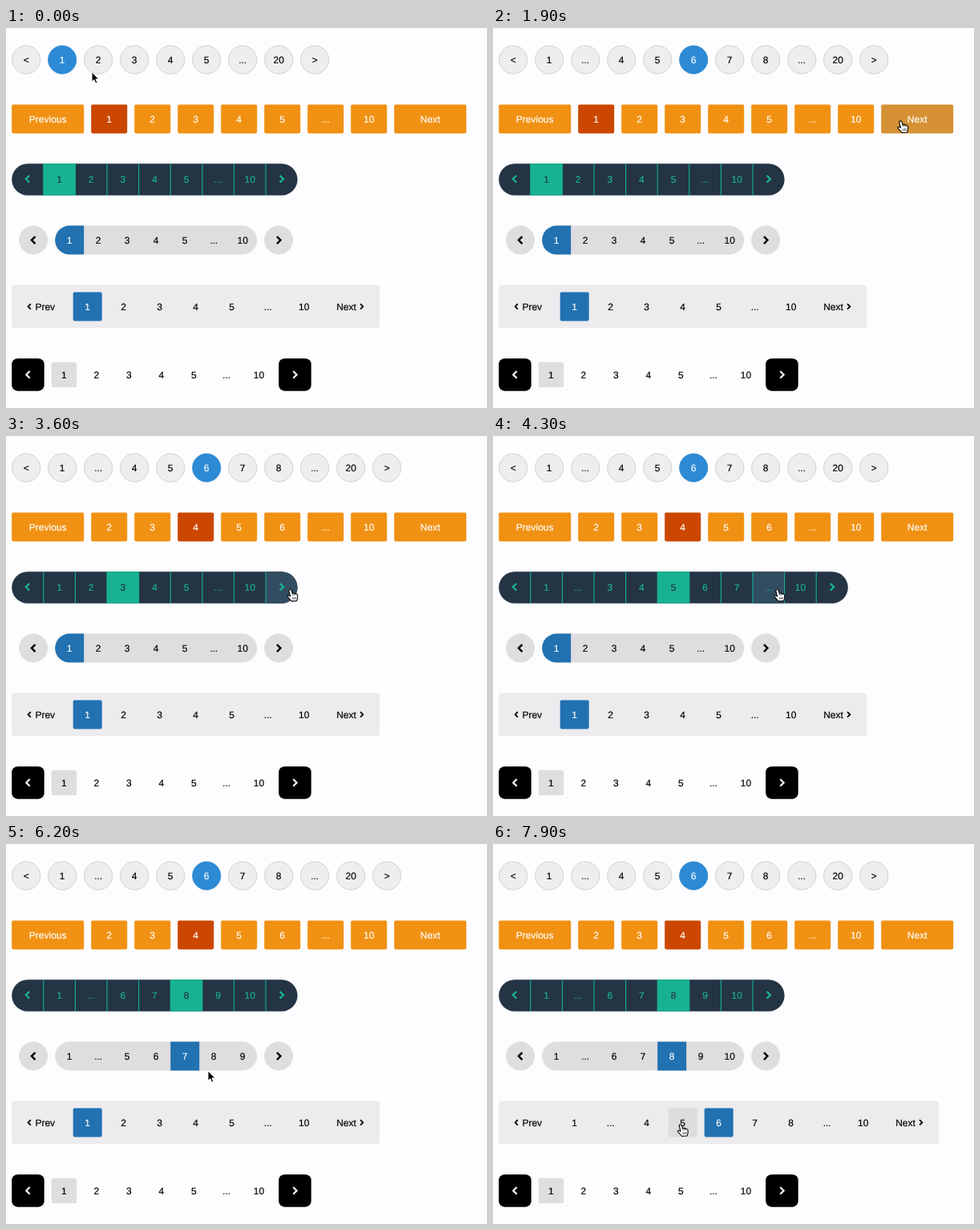
Write an HTML page that moves like this. It is 600 by 474 pixels and loops after 8000 ms.

```html
<!DOCTYPE html>
<html lang="en">
<head>
<meta charset="utf-8">
<title>Pagination styles</title>
<style>
  html, body { margin: 0; width: 100%; height: 100%; overflow: hidden; background: #fdfcfe; }
  svg { display: block; width: 600px; height: 474px; }
  text { font: 13.333px "Liberation Sans", Arial, sans-serif; text-rendering: geometricPrecision; stroke-width: .2; }
</style>
</head>
<body>
<svg id="stage" viewBox="0 0 600 474"></svg>
<script>
const stage = document.getElementById('stage');
const LOOP = 8000, STEP = 100, ZOOM = .9;
const INK = '#000', BLUE = '#2271b0', TEAL = '#1ab394', NAVY = '#243444';

// edge: width of the prev and next buttons, join: space beside them
const rows = {
  circles: { x: 8, y: 24, h: 40, edge: 40, join: 10, size: 40, gap: 10, total: 20, prev: '&lt;', next: '&gt;', round: true, paint: paintCircles },
  blocks: { x: 8, y: 106, h: 40, edge: 100, join: 10, size: 50, gap: 10, total: 10, prev: 'Previous', next: 'Next', paint: paintBlocks },
  dark: { x: 8, y: 188, h: 44, edge: 44, join: 0, size: 44, gap: 0, total: 10, paint: paintDark },
  pill: { x: 18, y: 274, h: 40, edge: 40, join: 10, size: 40, gap: 0, total: 10, paint: paintPill },
  panel: { x: 18, y: 366, h: 40, edge: 65, join: 10, size: 40, gap: 10, total: 10, prev: 'Prev', next: 'Next', paint: paintPanel },
  squares: { x: 8, y: 458, h: 45, edge: 45, join: 10, size: 35, gap: 10, total: 10, paint: paintSquares }
};

// Where the pointer goes: it arrives, clicks at a steady beat, then moves on
const visit = (at, row, slot, dx, clicks, dy = 3) => ({ at, row, slot, dx, clicks, dy });
const visits = [
  visit(0, 'circles', 2, -9, 0, 17),
  visit(100, 'circles', 2, -3, 1),
  visit(500, 'circles', 4, 0, 1),
  visit(1200, 'circles', 5, 11, 1),
  visit(1900, 'blocks', 8, -23, 3),
  visit(3100, 'dark', 8, 12, 5),
  visit(5200, 'pill', 6, 13, 2),
  visit(6200, 'pill', 6, -8, 0, 20.5),
  visit(6300, 'pill', 6, 0, 1),
  visit(7000, 'panel', 4, -3, 1),
  visit(7400, 'panel', 5, -3, 1),
  visit(7900, 'panel', 4, -3, 0)
];
const BEAT = 300, FIRST_CLICK = 200;

// A window of five pages, with edge buttons where pages are skipped
function pagesFor(current, total) {
  const start = Math.min(Math.max(current - 2, 1), total - 4);
  const list = Array.from({ length: 5 }, (_, i) => start + i);
  if (start > 2) list.unshift(1, '...');
  if (start + 4 < total - 1) list.push('...', total);
  return list;
}

function cellsFor(row, page) {
  const pages = pagesFor(page, row.total);
  const first = row.x + row.edge + row.join, pitch = row.size + row.gap;
  const cells = pages.map((text, i) => ({ text, to: text === '...' ? page + (i > 1 ? 3 : -3) : text, x: first + pitch * i, w: row.size, on: text === page }));
  const end = first + pitch * pages.length - row.gap + row.join;
  return [
    { text: row.prev, to: page - 1, x: row.x, w: row.edge, dir: -1 },
    ...cells,
    { text: row.next, to: page + 1, x: end, w: row.edge, dir: 1 }
  ].map(c => ({ ...c, cx: c.x + c.w / 2 }));
}

function hits(row, cell, [x, y]) {
  if (row.round) return Math.hypot(x - cell.cx, y - row.y - row.h / 2) < row.h / 2 - 1;
  return x >= cell.x && x < cell.x + cell.w && y >= row.y && y < row.y + row.h;
}

function aim({ row, slot, dx, dy }) {
  const r = rows[row];
  return [cellsFor(r, 1)[slot].cx + dx, r.y + r.h / 2 + dy];
}

function pointerAt(t) {
  const i = visits.findLastIndex(v => v.at <= t);
  const from = visits[i], to = visits[i + 1], start = aim(from);
  const leave = from.at + BEAT * from.clicks;
  if (!to || t <= leave) return start;
  const k = (t - leave) / (to.at - leave), ease = k * k * (3 - 2 * k);
  return aim(to).map((end, axis) => start[axis] + (end - start[axis]) * ease);
}

function pageAt(name, t) {
  const row = rows[name];
  let page = 1;
  for (const v of visits.filter(v => v.row === name)) {
    for (let n = 0; n < v.clicks && v.at + FIRST_CLICK + BEAT * n <= t; n++) {
      page = cellsFor(row, page).find(c => hits(row, c, aim(v))).to;
    }
  }
  return page;
}

const rect = (x, y, w, h, r, fill, extra = '') =>
  `<rect x="${x}" y="${y}" width="${w}" height="${h}" rx="${r}" fill="${fill}" ${extra}/>`;
const label = (x, y, s, color = INK, anchor = 'middle') =>
  `<text x="${x}" y="${y + 4.7}" fill="${color}" stroke="${color}" text-anchor="${anchor}">${s}</text>`;
const chevron = (x, y, dir, size, color, width) =>
  `<path d="M${x - dir * size / 2} ${y - size}l${dir * size} ${size}l${-dir * size} ${size}" fill="none" stroke="${color}" stroke-width="${width}"/>`;
// A bar end with its outer side rounded
const cap = (c, { y, h }, dir, fill) => {
  const r = h / 2, flat = dir < 0 ? c.x + c.w : c.x;
  return `<path d="M${flat} ${y}h${dir * (c.w - r)}a${r} ${r} 0 0 ${dir > 0 ? 1 : 0} 0 ${h}h${-dir * (c.w - r)}Z" fill="${fill}"/>`;
};

function paintCircles(row, cells, mid) {
  return cells.map(c => {
    const fill = c.on ? '#2d8ad4' : c.hover ? '#cfced0' : '#efedf0';
    return rect(c.x + .5, row.y + .5, 39, 39, 19.5, fill, `stroke="${c.on ? fill : '#cccbcd'}"`)
      + label(c.cx, mid, c.text, c.on ? '#fff' : INK);
  }).join('');
}

function paintBlocks(row, cells, mid) {
  return cells.map(c =>
    rect(c.x, row.y, c.w, row.h, 2, c.on ? '#cb4700' : c.hover ? '#d59134' : '#f19113')
    + label(c.cx, mid, c.text, '#fff')).join('');
}

function paintDark(row, cells, mid) {
  const end = cells[cells.length - 1].x + row.edge;
  const bar = rect(row.x, row.y, end - row.x, row.h, row.h / 2, NAVY);
  const faces = cells.map(c => {
    const fill = c.on ? '#18b292' : '#324d61';
    const back = !c.on && !c.hover ? '' : c.dir ? cap(c, row, c.dir, fill) : rect(c.x, row.y, c.w, row.h, 0, fill);
    return back + (c.dir ? chevron(c.cx, mid - .7, c.dir, 4.9, TEAL, 2.5) : label(c.cx, mid, c.text, c.on ? NAVY : TEAL));
  });
  const lines = cells.slice(1).map(c => rect(c.x - .6, row.y, 1.2, row.h, 0, TEAL));
  return bar + faces.join('') + lines.join('');
}

function paintPill(row, cells, mid) {
  const gray = '#dfdde0', light = '#f2f3f5', first = cells[1].x;
  const last = cells[cells.length - 2];
  return rect(first, row.y, last.x + last.w - first, row.h, 20, gray) + cells.map((c, i) => {
    if (c.dir) return rect(c.x, row.y, c.w, row.h, 20, c.hover ? light : gray) + chevron(c.cx, mid, c.dir, 5, INK, 2.7);
    const fill = c.on ? BLUE : light;
    const back = !c.on && !c.hover ? '' : i === 1 ? cap(c, row, -1, fill) : rect(c.x, row.y, c.w, row.h, 0, fill);
    return back + label(c.cx, mid, c.text, c.on ? '#fff' : INK);
  }).join('');
}

function paintPanel(row, cells, mid) {
  const pad = 10, end = cells[cells.length - 1].x + row.edge;
  return rect(row.x - pad, row.y - pad, end - row.x + 2 * pad, row.h + 2 * pad, 4, '#ecebed') + cells.map(c => {
    if (c.dir) {
      const [mark, text] = c.dir < 0 ? [14.5, 22.5] : [50, 15];
      return chevron(c.x + mark, mid, c.dir, 3.6, INK, 2) + label(c.x + text, mid, c.text, INK, 'start');
    }
    const back = c.on || c.hover ? rect(c.x, row.y, c.w, row.h, 2, c.on ? BLUE : '#dddcde') : '';
    return back + label(c.cx, mid, c.text, c.on ? '#fff' : INK);
  }).join('');
}

function paintSquares(row, cells, mid) {
  return cells.map(c => {
    if (c.dir) return rect(c.x, row.y, c.w, row.h, 8, '#000') + chevron(c.cx, mid, c.dir, 4.9, '#fff', 2.4);
    return (c.on ? rect(c.x, mid - c.w / 2, c.w, c.w, 3, '#dedde0') : '') + label(c.cx, mid, c.text);
  }).join('');
}

const HAND = `<path d="M-2 1.2C-2-.6 1-.8 1.6 1L3 5.2C4 4.4 5.4 4.6 5.8 5.6C6.8 4.9 8 5.3 8.3 6.3C9.4 6 10.2 6.8 10.2 8L10 12 9 15.5 1.8 16-3.6 10C-4.6 8.6-3 7.2-1.6 8.4L0 9.4Z" fill="#fff" stroke="#000" stroke-width="1.2" stroke-linejoin="round"/>
  <path d="M3 5.2L3.8 8M5.8 5.6L6.3 8M3.2 10.5L3.8 13.5M5.4 10.3L5.8 13.3M7.5 10.2V13" fill="none" stroke="#000" stroke-width=".8"/>`;
const ARROW = '<path d="M0 0V13.6L3.1 10.8 5.3 15.8 7.6 14.8 5.4 9.9H9.6Z" fill="#000" stroke="#fff"/>';

function draw(t) {
  const pointer = pointerAt(t);
  let hot = false;
  const body = Object.entries(rows).map(([name, row]) => {
    const cells = cellsFor(row, pageAt(name, t));
    cells.forEach(c => { c.hover = hits(row, c, pointer); hot = hot || c.hover; });
    return row.paint(row, cells, row.y + row.h / 2);
  }).join('');
  stage.innerHTML = `<g transform="scale(${ZOOM})">${body}<g transform="translate(${pointer})">${hot ? HAND : ARROW}</g></g>`;
}

let shown = -1;
const began = performance.now();
function tick() {
  const t = Math.floor((performance.now() - began) % LOOP / STEP) * STEP;
  if (t !== shown) draw(shown = t);
  requestAnimationFrame(tick);
}
tick();
</script>
</body>
</html>
```
